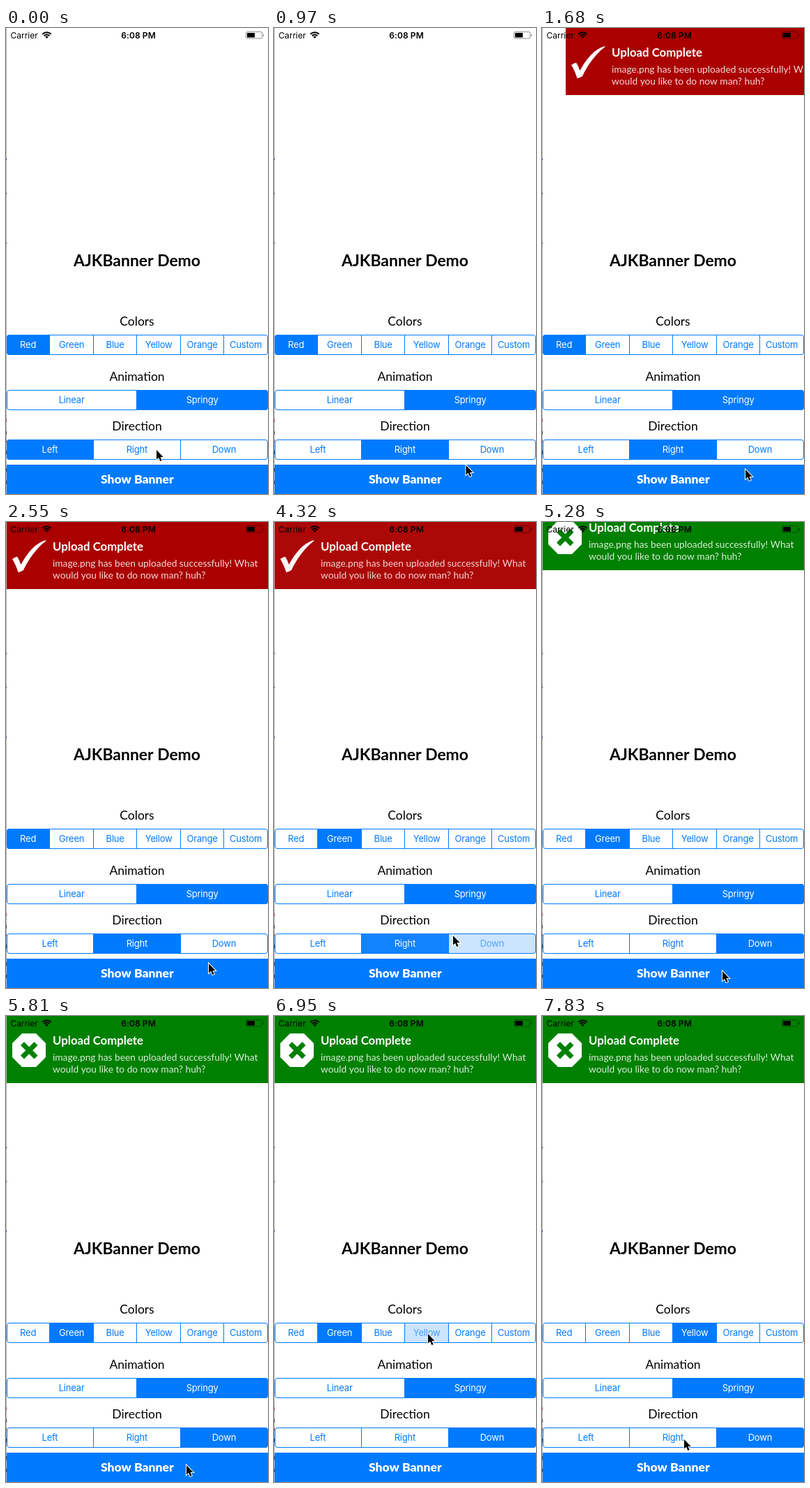
An HTML page with a canvas that plays this animation: 376x667 px, repeating every 8000 ms.

```html
<!DOCTYPE html>
<html lang="en">
<head>
<meta charset="utf-8">
<title>Banner demo</title>
<style>
html, body { margin: 0; width: 100%; height: 100%; overflow: hidden; background: #fff; }
canvas { display: block; width: 376px; height: 667px; }
</style>
</head>
<body>
<canvas id="stage"></canvas>
<script>
const W = 376, H = 667, LOOP = 8000, TICK = 88;
const BLUE = '#007aff';
const AVENIR = 'Lato, "Open Sans", sans-serif';
const SYSTEM = 'Inter, Roboto, sans-serif';

const canvas = document.getElementById('stage');
const ctx = canvas.getContext('2d');
const dpr = window.devicePixelRatio || 1;
canvas.width = W * dpr;
canvas.height = H * dpr;

// Taps: the segment is tinted from press to release, then cross-fades.
const rows = [
  { y: 439, labels: ['Red', 'Green', 'Blue', 'Yellow', 'Orange', 'Custom'], start: 0,
    taps: [{ to: 1, press: 3160, release: 3300 }, { to: 3, press: 6940, release: 7080 }] },
  { y: 518, labels: ['Linear', 'Springy'], start: 1, taps: [] },
  { y: 589, labels: ['Left', 'Right', 'Down'], start: 0,
    taps: [{ to: 1, press: 80, release: 170 }, { to: 2, press: 4190, release: 4295 }] }
];
const FADE = 240;
const buttonTaps = [{ press: 1150, release: 1400 }, { press: 4900, release: 5090 }];

// time, x, y of the pointer tip
const pointerPath = [
  [0, 216, 604], [560, 216, 604], [1150, 292, 632], [2400, 292, 632], [2560, 291, 632],
  [3150, 100, 453], [3510, 100, 453], [4150, 257, 592], [4330, 257, 592],
  [4670, 261, 636], [4850, 259, 643], [6200, 259, 643], [6900, 221, 455],
  [7180, 221, 455], [7600, 206, 617], [7800, 204, 606]
];

const clamp = v => Math.max(0, Math.min(1, v));
const ease = v => 0.5 - 0.5 * Math.cos(Math.PI * clamp(v));
const mix = (a, b, k) => a + (b - a) * k;

// Remaining distance (1 to 0) of a damped spring
function spring(ms) {
  if (ms <= 0) return 1;
  if (ms >= 790) return 0;
  const t = ms / 1000, zeta = 0.7, omega = 9.9;
  const damp = Math.sqrt(1 - zeta * zeta), wd = omega * damp * t;
  return Math.exp(-zeta * omega * t) * (Math.cos(wd) + zeta / damp * Math.sin(wd));
}

function text(str, x, y, font, color, align = 'left', spacing = 0) {
  ctx.font = font;
  ctx.letterSpacing = spacing + 'px';
  ctx.textAlign = align;
  ctx.fillStyle = color;
  ctx.fillText(str, x, y);
}

function rect(x, y, w, h, color) {
  ctx.fillStyle = color;
  ctx.fillRect(x, y, w, h);
}

function roundRect(x, y, w, h, r) {
  ctx.beginPath();
  ctx.roundRect(x, y, w, h, r);
}

function polygon(points) {
  ctx.beginPath();
  points.forEach(([x, y]) => ctx.lineTo(x, y));
  ctx.closePath();
}

function withAlpha(a, draw) {
  ctx.save();
  ctx.globalAlpha *= a;
  draw();
  ctx.restore();
}

function segmentState(row, i, t) {
  let on = row.start === i ? 1 : 0, pressed = 0;
  for (const tap of row.taps) {
    const k = clamp((t - tap.release) / FADE);
    if (t >= tap.release) on = mix(on, tap.to === i ? 1 : 0, k);
    if (tap.to === i && t >= tap.press) pressed = Math.max(pressed, 1 - k);
  }
  return { on, pressed };
}

function drawRow(row, t) {
  const n = row.labels.length, w = 375 / n, y = row.y;
  const font = '400 13px ' + SYSTEM;
  ctx.save();
  roundRect(1, y, 375, 29, 4);
  ctx.clip();
  row.labels.forEach((label, i) => {
    const { on, pressed } = segmentState(row, i, t);
    const left = Math.floor(1 + i * w), right = Math.floor(1 + (i + 1) * w);
    const cx = (i + 0.5) * w + 0.4;
    const write = color => text(label, cx, y + 19, font, color, 'center', -0.2);
    withAlpha(Math.max(on, pressed ? 0.2 : 0), () => rect(left, y, right - left, 29, BLUE));
    withAlpha((1 - on) * (1 - 0.35 * pressed), () => write(BLUE));
    withAlpha(on, () => write('#fff'));
    if (i) rect(left - 1, y, 1, 29, BLUE);
  });
  ctx.restore();
  roundRect(1.5, y + 0.5, 374, 28, 3.5);
  ctx.strokeStyle = BLUE;
  ctx.lineWidth = 1;
  ctx.stroke();
}

function drawButton(t) {
  rect(1, 625, 375, 42, BLUE);
  let a = 1;
  for (const { press, release } of buttonTaps) {
    if (t >= press) a = mix(0.25, 1, clamp((t - release) / 200));
  }
  withAlpha(a, () => text('Show Banner', 188.3, 652, '900 17.5px ' + AVENIR, '#fff', 'center'));
}

function drawTick() {
  ctx.beginPath();
  ctx.moveTo(9, 53);
  ctx.quadraticCurveTo(13, 50, 16, 49.5);
  ctx.quadraticCurveTo(19, 54, 21.5, 61);
  ctx.bezierCurveTo(30, 45, 42, 30, 57, 26);
  ctx.lineTo(57.5, 27);
  ctx.bezierCurveTo(43, 38, 32, 54, 25, 69);
  ctx.quadraticCurveTo(21, 71.5, 17.5, 72);
  ctx.quadraticCurveTo(14, 61, 9, 53);
  ctx.fillStyle = '#fff';
  ctx.fill();
}

function drawCross(color) {
  polygon([[23, 25], [43, 25], [57, 39], [57, 59], [43, 73], [23, 73], [9, 59], [9, 39]]);
  ctx.fillStyle = '#fff';
  ctx.fill();
  ctx.beginPath();
  ctx.moveTo(23.5, 39.5);
  ctx.lineTo(43, 59);
  ctx.moveTo(43, 39.5);
  ctx.lineTo(23.5, 59);
  ctx.strokeStyle = color;
  ctx.lineWidth = 7;
  ctx.stroke();
}

function drawBanner(dx, dy, alpha, color, icon) {
  ctx.save();
  ctx.beginPath();
  ctx.rect(1, 0, 375, H);
  ctx.clip();
  ctx.translate(Math.round(dx), Math.round(dy));
  ctx.globalAlpha = alpha;
  rect(1, 0, 375, 96, color);
  icon(color);
  text('Upload Complete', 67, 41, '700 16.8px ' + AVENIR, '#fff');
  const body = '400 13.75px ' + AVENIR, pale = 'rgba(255,255,255,.85)';
  text('image.png has been uploaded successfully! What', 67, 64, body, pale);
  text('would you like to do now man? huh?', 67, 81, body, pale);
  ctx.restore();
}

function drawBanners(t) {
  if (t >= 1400 && t < 4720) {
    drawBanner(375 * spring(t - 1400), 0, 1 - ease((t - 4260) / 460), '#aa0000', drawTick);
  }
  if (t >= 5080) drawBanner(0, -96 * spring(t - 5080), 1, '#008000', drawCross);
}

function drawStatusBar() {
  text('Carrier', 6.5, 14.5, '400 12px ' + SYSTEM, '#000');
  text('6:08 PM', 190, 14.5, '600 12px ' + SYSTEM, '#000', 'center', 0.1);

  ctx.strokeStyle = ctx.fillStyle = '#000';
  ctx.lineWidth = 2;
  const a = -Math.PI * 0.75, b = -Math.PI * 0.25;
  for (const r of [5.4, 8.8]) {
    ctx.beginPath();
    ctx.arc(58.5, 15, r, a, b);
    ctx.stroke();
  }
  ctx.beginPath();
  ctx.moveTo(58.5, 15);
  ctx.arc(58.5, 15, 3.2, a, b);
  ctx.fill();

  roundRect(344.5, 5.5, 23, 9.5, 2);
  ctx.lineWidth = 1;
  ctx.strokeStyle = 'rgba(0,0,0,.45)';
  ctx.stroke();
  rect(346, 7, 11, 6.5, '#000');
  rect(369, 9, 1, 3, 'rgba(0,0,0,.5)');
}

function drawWindowEdge() {
  rect(0, 0, 1, H, '#b4b4b4');
  for (const y of [187, 236, 307]) rect(0, y, 1, 2, '#3a3a90');
  for (const y of [560, 589]) rect(0, y, 1, 4, '#c04040');
  for (const y of [577, 605, 630, 648]) rect(0, y, 1, 5, '#444');
}

function drawPointer(t) {
  let i = pointerPath.findIndex(p => p[0] > t);
  if (i < 0) i = pointerPath.length;
  const a = pointerPath[i - 1], b = pointerPath[i] || a;
  const k = b === a ? 0 : ease((t - a[0]) / (b[0] - a[0]));
  ctx.save();
  ctx.translate(mix(a[1], b[1], k), mix(a[2], b[2], k));
  polygon([[0, 0], [0, 13.6], [3.1, 10.8], [5.3, 16], [7.7, 15], [5.5, 10], [9.7, 10]]);
  ctx.lineJoin = 'miter';
  ctx.lineWidth = 2;
  ctx.strokeStyle = '#fff';
  ctx.stroke();
  ctx.fillStyle = '#000';
  ctx.fill();
  ctx.restore();
}

function draw(t) {
  ctx.setTransform(dpr, 0, 0, dpr, 0, 0);
  rect(0, 0, W, H, '#fff');
  text('AJKBanner Demo', 188, 341, '700 22.9px ' + AVENIR, '#000', 'center');
  const caption = '400 17.5px ' + AVENIR;
  text('Colors', 188, 426, caption, '#000', 'center');
  text('Animation', 188, 505, caption, '#000', 'center');
  text('Direction', 188, 576, caption, '#000', 'center');
  rows.forEach(row => drawRow(row, t));
  drawButton(t);
  drawBanners(t);
  drawStatusBar();
  drawWindowEdge();
  drawPointer(t);
}

const origin = performance.now();
function tick() {
  const t = (performance.now() - origin) % LOOP;
  draw(Math.floor((t + 10) / TICK) * TICK);
  requestAnimationFrame(tick);
}
tick();
</script>
</body>
</html>
```
